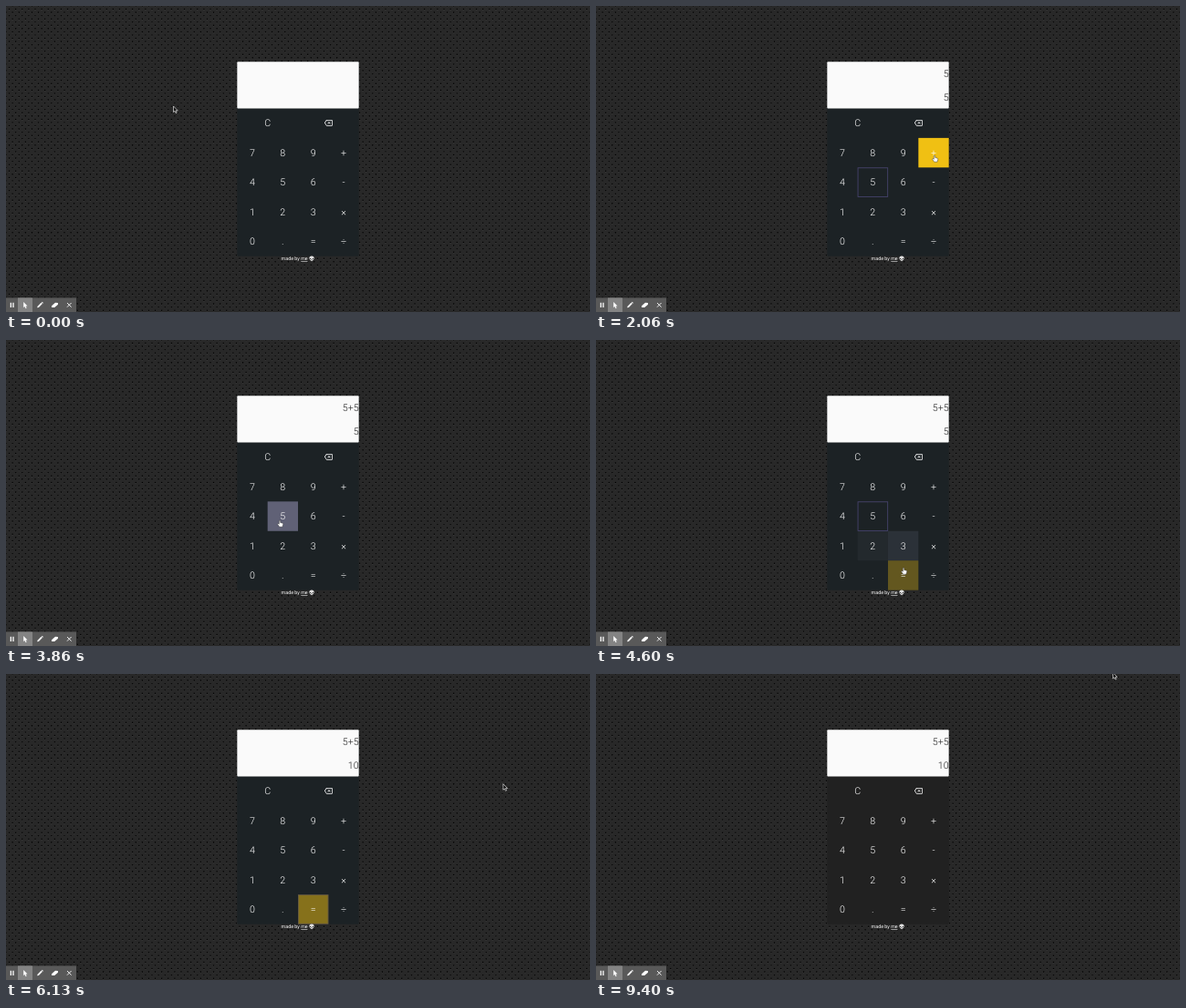
Animation, 640 px wide and 336 px high, one loop 9460 ms. Source, as an HTML page with a canvas:

```html
<!DOCTYPE html>
<html lang="en">
<head>
<meta charset="utf-8">
<title>Calculator</title>
<style>
  html, body { margin: 0; width: 100%; height: 100%; overflow: hidden; background: #282828; }
  canvas, svg { position: absolute; left: 0; top: 0; width: 640px; height: 336px; }
  text { font: 300 10.67px Roboto, sans-serif; text-rendering: geometricPrecision; }
  .key { fill: #fff; text-anchor: middle; }
  .screen { fill: #222; text-anchor: end; }
  .footer { font-size: 5.33px; font-weight: 400; fill: #fff; }
</style>
</head>
<body>
<canvas id="weave" width="640" height="336"></canvas>
<svg viewBox="0 0 640 336">
  <rect id="panel" x="253.33" y="61.33" width="133.33" height="213.33" rx="1" fill="#1c2225"/>
  <rect x="253.33" y="61.33" width="133.33" height="51.1" rx=".9" fill="#fafafa"/>
  <text class="screen" id="formula" x="386.67" y="77.8"></text>
  <text class="screen" id="value" x="386.67" y="103.7"></text>
  <g id="keys"></g>
  <g transform="translate(348.9 123.9) scale(.37)">
    <path fill="#fff" d="M22 3H7c-.7 0-1.2.35-1.6.9L0 12l5.4 8.1c.4.5.9.9 1.6.9h15c1.1 0 2-.9 2-2V5c0-1.1-.9-2-2-2zm0 16H7L2.4 12 7 5H22z" fill-rule="evenodd"/>
    <path d="M10 8l8 8M18 8l-8 8" stroke="#fff" stroke-width="2"/>
  </g>
  <rect id="focus" width="32.6" height="31.7" fill="none" stroke="#45436b" stroke-width=".9"/>

  <text class="footer" x="301.6" y="279.3">made by <tspan text-decoration="underline">me</tspan></text>
  <path d="M332.3 277q0-2.6 2.7-2.6t2.7 2.6q-.3 2.1-2.7 3.3-2.4-1.2-2.7-3.3z" fill="#e2e2e2"/>
  <path d="M333.1 277.1l1.4 1.1M336.9 277.1l-1.4 1.1" stroke="#222" stroke-width="1"/>

  <g id="toolbar" fill="#fff">
    <rect y="320.4" width="77" height="15.6" fill="#595959"/>
    <rect x="13" y="320.4" width="16" height="15.6" fill="#848484"/>
    <path d="M4.7 325.7h1.3v5.2h-1.3zM7.3 325.7h1.3v5.2h-1.3z"/>
    <path d="M19.2 325v6l1.4-1.1 1 2.3 1-.5-1-2.1h1.9z"/>
    <path d="M34.2 331.3l.4-1.6 3.9-3.9 1.3 1.3-3.9 3.9zM39 325.4l.7-.6 1.2 1.2-.7.7z"/>
    <path d="M50 329.3l4-3.6 3 .3v1.8l-3.8 3.3-3.2-.2z"/>
    <path d="M67 326l4.6 4.6M71.6 326l-4.6 4.6" stroke="#fff" stroke-width=".9"/>
  </g>

  <path id="arrow" d="M0 0V6.5L1.5 5.2 2.6 7.6 3.7 7.1 2.6 4.8H4.7Z" fill="#111" stroke="#fff" stroke-width=".6"/>
  <path id="hand" d="M-.7.4Q0-.5.7.4V2.5L3 3.1Q4 3.4 3.7 4.5L3 7.2H-.3L-2.5 4.3Q-2.3 3.2-1.3 3.8L-.7 4.3Z" fill="#fff" stroke="#111" stroke-width=".4"/>
</svg>
<script>
const LOOP = 9460, STEP = 10, FADE = 300;
const LEFT = 253.33, TOP = 112.44, KEY_W = 33.333, KEY_H = 32.444;
const PANEL = [28, 34, 37], DIGIT = [96, 97, 118], OPERATOR = [240, 192, 19];
const $ = id => document.getElementById(id);

// Cursor tip: time, x, y
const path = [
  [0, 183.5, 110], [60, 183.5, 110], [400, 258, 188], [600, 292, 216], [690, 299, 204],
  [860, 300, 199], [1280, 300, 199], [1450, 320, 189], [1570, 338, 177], [1700, 354, 169],
  [1900, 371, 164], [2270, 371, 164], [2500, 353, 172], [2850, 320, 190], [3000, 300, 198],
  [3880, 300, 198], [4030, 303, 209.8], [4330, 320, 230], [4490, 331, 242.2], [4600, 337, 250],
  [4800, 340, 254], [5940, 340.5, 254], [5980, 353.5, 246], [6060, 430, 193], [6130, 544.5, 121],
  [6300, 605, 70], [6500, 592, 25], [6800, 566.5, -1.5], [LOOP, 566.5, -1.5]
];
// Time, formula, value, focused key
const states = [
  [0, '', '', ''], [860, '5', '5', '5'], [2130, '5+', '5', '+'],
  [3060, '5+5', '5', '5'], [5000, '5+5', '10', '='], [7800, '5+5', '10', '']
];

function drawWeave() {
  const ctx = $('weave').getContext('2d');
  ctx.fillStyle = '#282828';
  ctx.fillRect(0, 0, 640, 336);
  ctx.scale(4 / 9, 4 / 9);
  const dots = (color, radius, dy) => {
    ctx.fillStyle = color;
    for (let row = 0; row <= 95; row++)
      for (let x = row % 2 * 8; x <= 1448; x += 16) {
        ctx.beginPath();
        ctx.arc(x, row * 8 + dy, radius, 0, 7);
        ctx.fill();
      }
  };
  dots('rgba(255,255,255,.1)', 2, 1);
  dots('#000', 1.75, 0);
}

function addShape(name, attributes, text = '') {
  const node = document.createElementNS('http://www.w3.org/2000/svg', name);
  for (const key in attributes) node.setAttribute(key, attributes[key]);
  node.textContent = text;
  return $('keys').appendChild(node);
}

const keys = [];
['789+', '456-', '123×', '0.=÷'].forEach((line, row) => [...line].forEach((label, col) => {
  const x = LEFT + col * KEY_W, y = TOP + (row + 1) * KEY_H;
  const rect = addShape('rect', { x, y, width: KEY_W, height: KEY_H });
  addShape('text', { class: 'key', x: x + KEY_W / 2, y: y + KEY_H / 2 + 3.7 }, label);
  keys.push({ label, x, y, rect, hover: /[\d.]/.test(label) ? DIGIT : OPERATOR, levels: [0] });
}));
addShape('text', { class: 'key', x: LEFT + KEY_W, y: TOP + KEY_H / 2 + 3.7 }, 'C');

function cursorAt(t) {
  const i = path.findIndex(p => p[0] > t);
  const [t0, x0, y0] = path[i - 1], [t1, x1, y1] = path[i];
  const k = (t - t0) / (t1 - t0);
  return [x0 + (x1 - x0) * k, y0 + (y1 - y0) * k];
}

const inside = (x, y, left, top, w, h) => x >= left && x < left + w && y >= top && y < top + h;

// Hover fades depend on the whole cursor path, so they are worked out once.
for (let t = 0, i = 1; t < LOOP; t += STEP, i++) {
  const [x, y] = cursorAt(t);
  for (const key of keys) {
    const change = inside(x, y, key.x, key.y, KEY_W, KEY_H) ? STEP / FADE : -STEP / FADE;
    key.levels[i] = Math.min(1, Math.max(0, key.levels[i - 1] + change));
  }
}

function draw(t) {
  const [, formula, value, focused] = states.findLast(s => s[0] <= t);
  $('formula').textContent = formula;
  $('value').textContent = value;

  const panel = t >= 9400 ? [33, 33, 33] : PANEL;
  $('panel').setAttribute('fill', `rgb(${panel})`);
  $('focus').setAttribute('opacity', 0);
  for (const key of keys) {
    const level = key.levels[Math.floor(t / STEP)];
    key.rect.setAttribute('fill', `rgb(${key.hover})`);
    key.rect.setAttribute('fill-opacity', level);
    if (key.label === focused) {
      $('focus').setAttribute('x', key.x + .4);
      $('focus').setAttribute('y', key.y + .4);
      $('focus').setAttribute('opacity', 1 - level);
    }
  }

  const [x, y] = cursorAt(t);
  const overKeys = inside(x, y, LEFT, TOP, KEY_W * 4, KEY_H * 5);
  for (const [id, shown] of [['arrow', !overKeys], ['hand', overKeys]]) {
    $(id).setAttribute('transform', `translate(${x} ${y})`);
    $(id).setAttribute('visibility', shown ? 'visible' : 'hidden');
  }
}

function tick() {
  draw(performance.now() % LOOP);
  requestAnimationFrame(tick);
}
drawWeave();
tick();
</script>
</body>
</html>
```
